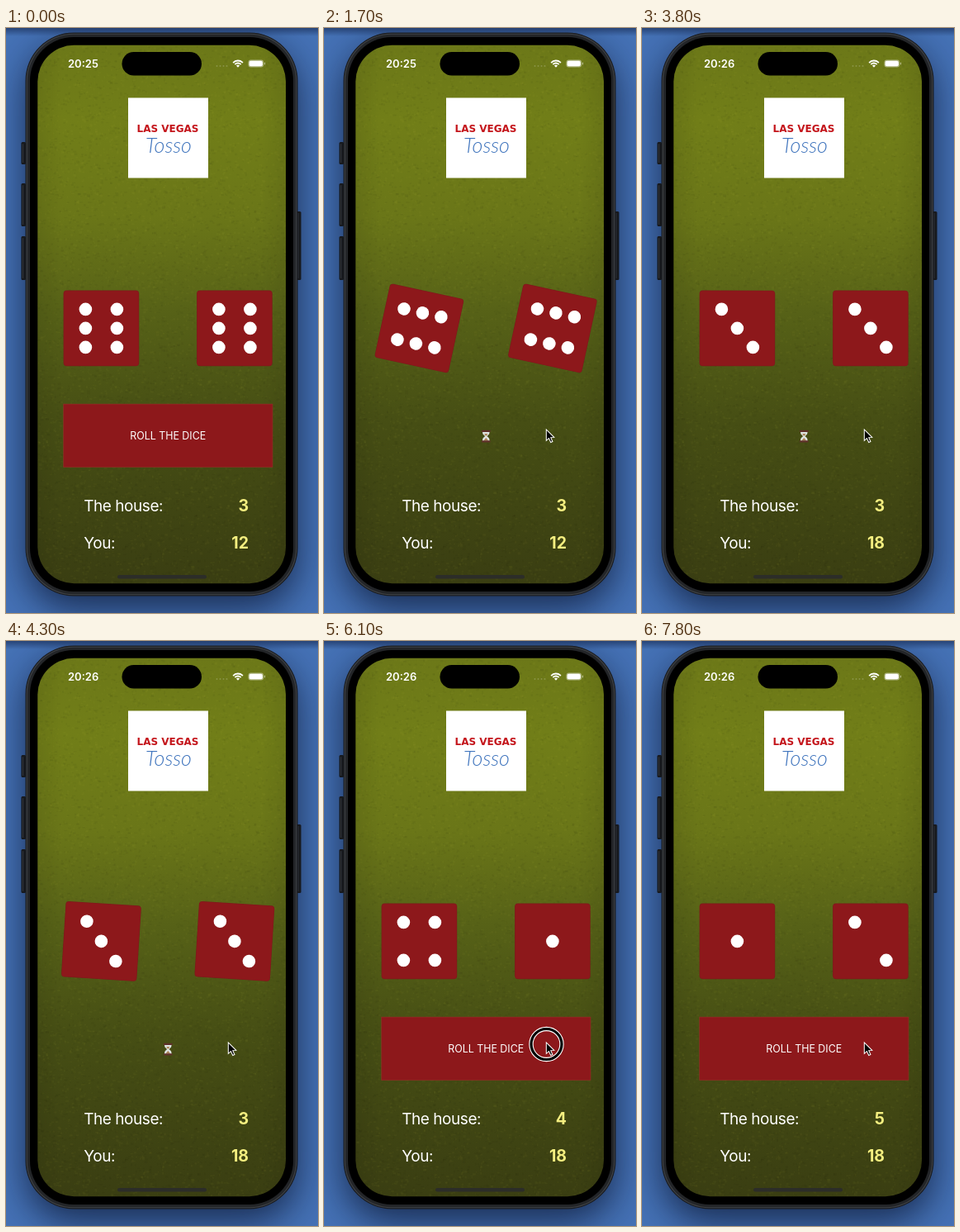
Recreate the animation shown at these times as an HTML page with a canvas. Size 378x708 px, loop 8 s.

```html
<!DOCTYPE html>
<html lang="en">
<head>
<meta charset="utf-8">
<title>Roll the dice</title>
<style>
html, body { margin: 0; width: 100%; height: 100%; overflow: hidden; background: #426daf; }
canvas { display: block; width: 378px; height: 708px; }
</style>
</head>
<body>
<canvas id="stage"></canvas>
<script>
const W = 378, H = 708, LOOP = 8000, STEP = 100, SPIN = 1000;
const RED = '#8d181b';
const SANS = 'Inter, Roboto, sans-serif';
const scale = window.devicePixelRatio || 1;

// Each roll shows its dice and scores once its spin has ended.
const start = { dice: [6, 6], house: 3, you: 12 };
const rolls = [
  { at: 1345, dice: [3, 3], house: 3, you: 18 },
  { at: 3794, dice: [4, 1], house: 4, you: 18 },
  { at: 6293, dice: [1, 2], house: 5, you: 18 }
];

const TL = [-19, -23], TR = [19, -23], L = [-19, 0], R = [19, 0];
const BL = [-19, 23], BR = [19, 23], C = [0, 0];
const PIPS = {
  1: [C], 2: [TL, BR], 3: [TL, C, BR],
  4: [TL, TR, BL, BR], 6: [TL, TR, L, R, BL, BR]
};

function sized(canvas) {
  canvas.width = W * scale;
  canvas.height = H * scale;
  const c = canvas.getContext('2d');
  c.scale(scale, scale);
  return c;
}

const ctx = sized(document.getElementById('stage'));
const scene = document.createElement('canvas');

function box(c, x, y, w, h, r, fill) {
  c.beginPath();
  c.roundRect(x, y, w, h, r);
  c.fillStyle = fill;
  c.fill();
}

function disc(c, x, y, r, fill) {
  c.beginPath();
  c.arc(x, y, r, 0, Math.PI * 2);
  c.fillStyle = fill;
  c.fill();
}

function poly(c, points, fill) {
  c.beginPath();
  points.forEach(([x, y]) => c.lineTo(x, y));
  c.closePath();
  c.fillStyle = fill;
  c.fill();
}

function text(c, str, x, y, font, fill, align = 'left', tracking = 0) {
  c.font = font;
  c.letterSpacing = `${tracking}px`;
  c.fillStyle = fill;
  c.textAlign = align;
  c.fillText(str, x, y);
}

function gradient(c, x0, y0, x1, y1, stops) {
  const g = c.createLinearGradient(x0, y0, x1, y1);
  stops.forEach(([at, color]) => g.addColorStop(at, color));
  return g;
}

function seeded(seed) {
  return () => (seed = (seed * 16807) % 2147483647) / 2147483647;
}

function drawPhone(c) {
  c.fillStyle = '#4572b6';
  c.fillRect(0, 0, W, H);

  c.save();
  c.shadowColor = 'rgba(8, 18, 45, 0.72)';
  c.shadowBlur = 44 * scale;
  c.shadowOffsetY = 16 * scale;
  box(c, 24, 6, 329, 681, 58, '#000');
  c.restore();
  c.fillStyle = gradient(c, 0, 0, 0, 10, [[0, 'rgba(15,30,65,.55)'], [1, 'rgba(15,30,65,0)']]);
  c.fillRect(0, 0, W, 10);

  for (const [x, y, h] of [[18.5, 138, 27], [18.5, 188, 52], [18.5, 252, 53], [352, 222, 83]]) {
    box(c, x, y, 5.5, h, 1.5, '#17191d');
    box(c, x + 1.5, y + 2, 1, h - 4, 0.5, '#33373d');
  }
  box(c, 23.5, 5.5, 330, 682, 58.5, '#1b1d20');
  box(c, 24.7, 6.7, 327.6, 679.6, 57.3, '#3f4246');
  box(c, 25.8, 7.8, 325.4, 677.4, 56.2, '#232528');
  box(c, 29, 11, 319, 671, 53, '#000');
}

function drawFelt(c) {
  c.save();
  c.beginPath();
  c.roundRect(38.3, 20.8, 300.7, 651.4, 44);
  c.clip();
  c.fillStyle = gradient(c, 0, 21, 0, 672, [
    [0, '#6c7818'], [0.14, '#717e18'], [0.32, '#6a7618'],
    [0.5, '#566117'], [0.7, '#464e14'], [1, '#3a3e12']
  ]);
  c.fillRect(38, 20, 302, 653);
  const rnd = seeded(77);
  for (let i = 0; i < 9000; i++) {
    c.fillStyle = rnd() < 0.5 ? 'rgba(0,0,0,.045)' : 'rgba(190,200,70,.04)';
    c.fillRect(38 + rnd() * 301, 21 + rnd() * 651, 1 + rnd() * 3, 1 + rnd() * 2);
  }
  c.fillStyle = gradient(c, 38, 0, 339, 0, [
    [0, 'rgba(0,0,0,.08)'], [0.1, 'rgba(0,0,0,0)'],
    [0.9, 'rgba(0,0,0,0)'], [1, 'rgba(0,0,0,.08)']
  ]);
  c.fillRect(38, 20, 302, 653);
  c.restore();
}

function drawStatus(c) {
  box(c, 140.5, 29, 96.5, 28.5, 14.25, '#000');
  for (let i = 0; i < 4; i++) disc(c, 255.5 + i * 4, 46, 1, 'rgba(255,255,255,.2)');
  c.strokeStyle = '#fff';
  c.lineWidth = 1.8;
  for (const r of [8, 5]) {
    c.beginPath();
    c.arc(281, 47.5, r, -Math.PI * 0.76, -Math.PI * 0.24);
    c.stroke();
  }
  poly(c, [[278.9, 45.4], [281, 44.6], [283.1, 45.4], [281, 47.8]], '#fff');
  box(c, 293.5, 38.5, 18.5, 9, 3, 'rgba(255,255,255,.45)');
  box(c, 294.7, 39.7, 16, 6.6, 2, '#fff');
  box(c, 312.8, 41.5, 1.2, 3, 0.6, 'rgba(255,255,255,.5)');
  box(c, 135, 662, 108, 4.5, 2.25, '#2c2d28');
}

function drawTitle(c) {
  c.fillStyle = '#fff';
  c.fillRect(148, 84.5, 97, 97);
  text(c, 'LAS VEGAS', 196, 126, 'bold 12px "DejaVu Sans", sans-serif', '#c4161c', 'center');
  text(c, 'Tosso', 197, 151, 'italic 300 25px Lato, sans-serif', '#3f74bd', 'center');
}

function buildScene() {
  const c = sized(scene);
  drawPhone(c);
  drawFelt(c);
  drawStatus(c);
  drawTitle(c);
  text(c, 'The house:', 94.2, 585.4, `19px ${SANS}`, '#fff', 'left', -0.45);
  text(c, 'You:', 94.2, 630.4, `19px ${SANS}`, '#fff', 'left', -0.45);
}

function drawDie(x, value, angle) {
  ctx.save();
  ctx.translate(x, 363.4);
  ctx.rotate(angle);
  box(ctx, -45.8, -45.8, 91.6, 91.6, 4, '#7d1a1b');
  box(ctx, -45.2, -45.2, 90.4, 90.4, 3.5, RED);
  PIPS[value].forEach(([px, py]) => disc(ctx, px, py, 7.8, '#fff'));
  ctx.restore();
}

function drawButton() {
  ctx.fillStyle = '#8f2f24';
  ctx.fillRect(69.3, 454.8, 254, 77);
  ctx.fillStyle = RED;
  ctx.fillRect(70, 455.5, 252.6, 75.6);
  text(ctx, 'ROLL THE DICE', 196.2, 498, `12.4px ${SANS}`, '#fff', 'center');
}

function drawHourglass() {
  const x = 196.3, y = 494;
  poly(ctx, [[x - 4.5, y - 6], [x + 4.5, y - 6], [x + 3.8, y - 2.5], [x + 1.2, y],
    [x + 3.8, y + 2.5], [x + 4.5, y + 6], [x - 4.5, y + 6], [x - 3.8, y + 2.5],
    [x - 1.2, y], [x - 3.8, y - 2.5]], '#dfe5e3');
  poly(ctx, [[x - 2.2, y - 3], [x + 2.2, y - 3], [x, y]], '#a87f55');
  poly(ctx, [[x, y + 2], [x + 3, y + 5.5], [x - 3, y + 5.5]], '#a87f55');
  for (const dy of [-7.2, 5.2]) box(ctx, x - 5.4, y + dy, 10.8, 2.2, 0.8, '#5e3029');
}

function drawCursor(x, y) {
  ctx.save();
  ctx.translate(x, y);
  ctx.scale(0.92, 0.92);
  poly(ctx, [[0, 0], [0, 14.5], [3.4, 11.4], [5.9, 16.8], [8.3, 15.7], [5.9, 10.5], [10.3, 10.2]], '#000');
  ctx.strokeStyle = '#fff';
  ctx.lineWidth = 1.1;
  ctx.stroke();
  ctx.restore();
}

function drawRing() {
  for (const [width, color] of [[5.4, '#fff'], [3.2, '#000']]) {
    ctx.beginPath();
    ctx.arc(269.5, 488, 18.5, 0, Math.PI * 2);
    ctx.strokeStyle = color;
    ctx.lineWidth = width;
    ctx.stroke();
  }
}

// Cubic ease-in with control points (.42, 0) and (1, 1).
function easeIn(x) {
  let lo = 0, hi = 1;
  for (let i = 0; i < 24; i++) {
    const s = (lo + hi) / 2, q = 1 - s;
    if (1.26 * q * q * s + 3 * q * s * s + s ** 3 < x) lo = s; else hi = s;
  }
  return 3 * (1 - lo) * lo * lo + lo ** 3;
}

function easeInOut(p) {
  return p < 0.5 ? easeIn(p * 2) / 2 : 1 - easeIn(2 - p * 2) / 2;
}

function draw(t) {
  const state = rolls.filter(r => t >= r.at + SPIN).pop() || start;
  const spin = rolls.find(r => t >= r.at && t < r.at + SPIN);
  const pressed = rolls.some(r => t >= r.at - 250 && t < r.at - 40);
  const angle = spin ? easeInOut((t - spin.at) / SPIN) * Math.PI * 2 : 0;

  ctx.drawImage(scene, 0, 0, W, H);
  text(ctx, t < 3500 ? '20:25' : '20:26', 75, 47.7, `600 13px ${SANS}`, '#fff');
  drawDie(115.4, state.dice[0], angle);
  drawDie(276.9, state.dice[1], angle);
  if (spin) drawHourglass(); else drawButton();
  text(ctx, state.house, 294, 585.4, `bold 19.5px ${SANS}`, '#f5ef80', 'right');
  text(ctx, state.you, 294, 630.4, `bold 19.5px ${SANS}`, '#f5ef80', 'right');

  if (pressed) drawRing();
  if (t >= 300) {
    const left = (1 - Math.min(1, (t - 300) / 600)) ** 3;
    drawCursor(269.3 + 110 * left, 486 + 150 * left);
  }
}

function frame() {
  const t = performance.now() % LOOP;
  draw(Math.floor(t / STEP) * STEP);
  requestAnimationFrame(frame);
}

buildScene();
frame();
</script>
</body>
</html>
```
